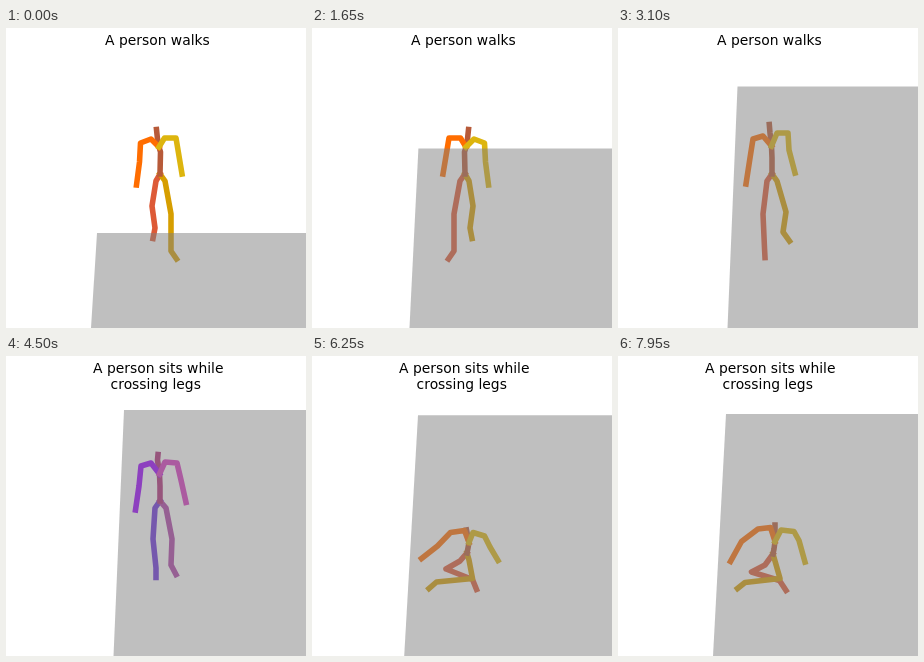
Animation, 300 px wide and 300 px high, one loop 8000 ms. Source, as an HTML page with a canvas:

```html
<!DOCTYPE html>
<html>
<head>
<meta charset="utf-8">
<style>
  html, body { margin: 0; width: 100%; height: 100%; overflow: hidden; background: #fff; }
  canvas { display: block; width: 300px; height: 300px; }
</style>
</head>
<body>
<canvas id="stage"></canvas>
<script>
const LOOP = 8000, STEP = 50;
const WARM = ['#DD5A37', '#D69E00', '#B75A39', '#FF6D00', '#DDB50E'];
const COOL = ['#6B31DB', '#AD40A8', '#AF2B79', '#9B00FF', '#D836C1'];

// Each pose: right leg, left leg (from the hip), spine (pelvis to head),
// right arm, left arm (from the collar).
const stride = [
  [150,153, 146,178, 149,200, 147,210.5],
  [159,153, 165,186, 165,223, 170.5,231],
  [154,146, 154.5,124, 153,119, 151.5,111, 150.5,101.5],
  [145,111, 134.5,115, 133.5,134, 130.5,157],
  [158.5,110, 170,110, 173,128, 176,146]
];
const lift = [
  [150,153, 146,173, 144,189, 142.8,196],
  [159,153, 162.5,187, 160,220, 164.5,228.5],
  [154.5,146, 154.5,130, 154,120, 153.5,108, 153,99],
  [147.5,108.5, 136,111, 134.5,130, 130,155.5],
  [161,108, 172.5,109, 172.5,124, 176.5,146]
];
const swing = [
  [149,153, 144.5,184, 145.5,213, 144,223],
  [159,153, 164,178, 165.5,191, 170.5,201],
  [155,146, 155,128, 154,118, 151.5,106, 149.5,96.5],
  [145,107.5, 135,110, 137,127, 132,148.5],
  [160,106, 171,107, 176,125, 176,146]
];
const swingWide = [
  [149,153, 145,186, 146.5,220, 147,229.5],
  [159,153, 168,184, 165,204, 171.5,213],
  [154,146, 154,130, 153.5,118, 152,105, 151.3,96.5],
  [145,108, 135,111, 132,130, 128,156],
  [159,105, 170,105, 171,122, 177,145]
];
const stand = [
  [149,152, 147,183, 150,212, 150,221.5],
  [160,152, 166,183, 165,209, 170,218.5],
  [154,145, 154,130, 153.5,118, 151.5,104, 152,98.5],
  [145,107, 135,110, 133,130, 129.5,154],
  [159,106, 171,107, 175,124, 180,146.5]
];
const crouch = [
  [149,180, 138,196, 153,221, 150,231],
  [161,180, 160,205, 150,223, 145,231],
  [155,172, 154,160, 152,149, 150,137, 150,130],
  [143,137, 133,142, 124,157, 112,172],
  [158,138, 171,140, 180,155, 188,172]
];
const sit = [
  [148,205, 134,213, 160.5,223.5, 164.5,233.5],
  [157,204, 160.5,222.5, 124.5,226, 117,232.5],
  [155,197, 156,192, 157,186.5, 155.5,179, 154.5,174],
  [152.5,174.5, 138.5,176.5, 125.5,190, 109.5,202.5],
  [161,176.5, 172.5,180, 178,191, 186,204.5]
];
const rest = [
  [147,209, 133.5,216, 161.5,224.5, 168,234.5],
  [157,205, 162,222.5, 127,226.5, 119.5,232.5],
  [155,198, 156,193, 157,185.5, 157,175, 157,169],
  [152.5,171.5, 140,173, 123.5,185.5, 112.5,205.5],
  [163,174, 176,175.5, 181,184.5, 187,206]
];

const mirror = pose => [1, 0, 2, 4, 3].map(i => pose[i].map((v, k) => k % 2 ? v : 307 - v));

// Four gait cycles, then the move to the floor.
const CYCLE = 1100;
const poses = [];
for (let n = 0; n < 4; n++) {
  const side = n % 2 ? swingWide : swing;
  const end = n === 0 ? swing : swingWide;
  [[0, stride], [200, lift], [350, mirror(side)], [550, mirror(stride)],
   [750, mirror(lift)], [900, end]]
    .forEach(([t, pose]) => poses.push([n * CYCLE + t, pose]));
}
const reach = sit.map((part, i) => i < 4 ? part : [161,176.5, 173,180, 183,189, 193,201]);
poses.push([4500, stand], [4750, stand], [5300, crouch], [5850, reach], [6250, sit],
           [7400, rest], [LOOP, rest]);

// Floor: top edge y, left x at the top, left x at the stage bottom.
const floor = [
  [0, [[205, 91, 85]]], [200, [[195, 90, 83.7]]], [900, [[157, 101, 93]]],
  [1200, [[142, 101, 92.7]]], [1700, [[118, 107, 98]]], [2400, [[84, 114, 105]]],
  [2550, [[77.5, 114, 104.8]]], [3100, [[58.5, 119.5, 109.5]]],
  [3550, [[54, 115.5, 105]]], [4000, [[53.3, 118.5, 108]]], [4500, [[54, 118, 107.5]]],
  [5100, [[59.5, 112, 100]]], [5950, [[59.2, 107, 93.5]]], [6250, [[59.2, 106, 92.2]]],
  [6800, [[59, 107.7, 94.8]]], [7650, [[58, 108, 95]]], [LOOP, [[58, 108, 95]]]
];

function sample(track, t) {
  let i = 0;
  while (i < track.length - 2 && track[i + 1][0] <= t) i++;
  const [t0, a] = track[i], [t1, b] = track[i + 1];
  const p = (t - t0) / (t1 - t0);
  return a.map((part, j) => part.map((v, k) => v + (b[j][k] - v) * p));
}

const canvas = document.getElementById('stage');
const ctx = canvas.getContext('2d');
const ratio = window.devicePixelRatio || 1;
canvas.width = canvas.height = 300 * ratio;
ctx.scale(ratio, ratio);

function polyline(points, color) {
  ctx.beginPath();
  for (let i = 0; i < points.length; i += 2) ctx.lineTo(points[i], points[i + 1]);
  ctx.strokeStyle = color;
  ctx.stroke();
}

function drawBody(pose, colors) {
  const spine = pose[2], pelvis = spine.slice(0, 2), chest = spine.slice(4, 6);
  const roots = [pelvis, pelvis, [], chest, chest];
  ctx.lineWidth = 5.56;
  ctx.lineCap = 'square';
  ctx.lineJoin = 'round';
  pose.forEach((part, i) => polyline([...roots[i], ...part], colors[i]));
}

function drawFloor([top, xTop, xBottom]) {
  ctx.fillStyle = 'rgba(128,128,128,.5)';
  ctx.beginPath();
  ctx.moveTo(xTop, top);
  ctx.lineTo(300, top);
  ctx.lineTo(300, 300);
  ctx.lineTo(xBottom, 300);
  ctx.fill();
}

function drawTitle(t) {
  ctx.fillStyle = '#000';
  ctx.font = '13.89px "DejaVu Sans", sans-serif';
  if (t < 4350) {
    ctx.fillText('A person walks', 99, 17);
  } else {
    ctx.fillText('A person sits while', 87, 17);
    ctx.fillText('crossing legs', 104.6, 33);
  }
}

function draw(now) {
  const t = Math.floor((now % LOOP) / STEP) * STEP;
  ctx.fillStyle = '#fff';
  ctx.fillRect(0, 0, 300, 300);
  drawBody(sample(poses, t), t >= 3850 && t < 4850 ? COOL : WARM);
  drawFloor(sample(floor, t)[0]);
  drawTitle(t);
}

const start = performance.now();
function tick() {
  draw(performance.now() - start);
  requestAnimationFrame(tick);
}
tick();
</script>
</body>
</html>
```
